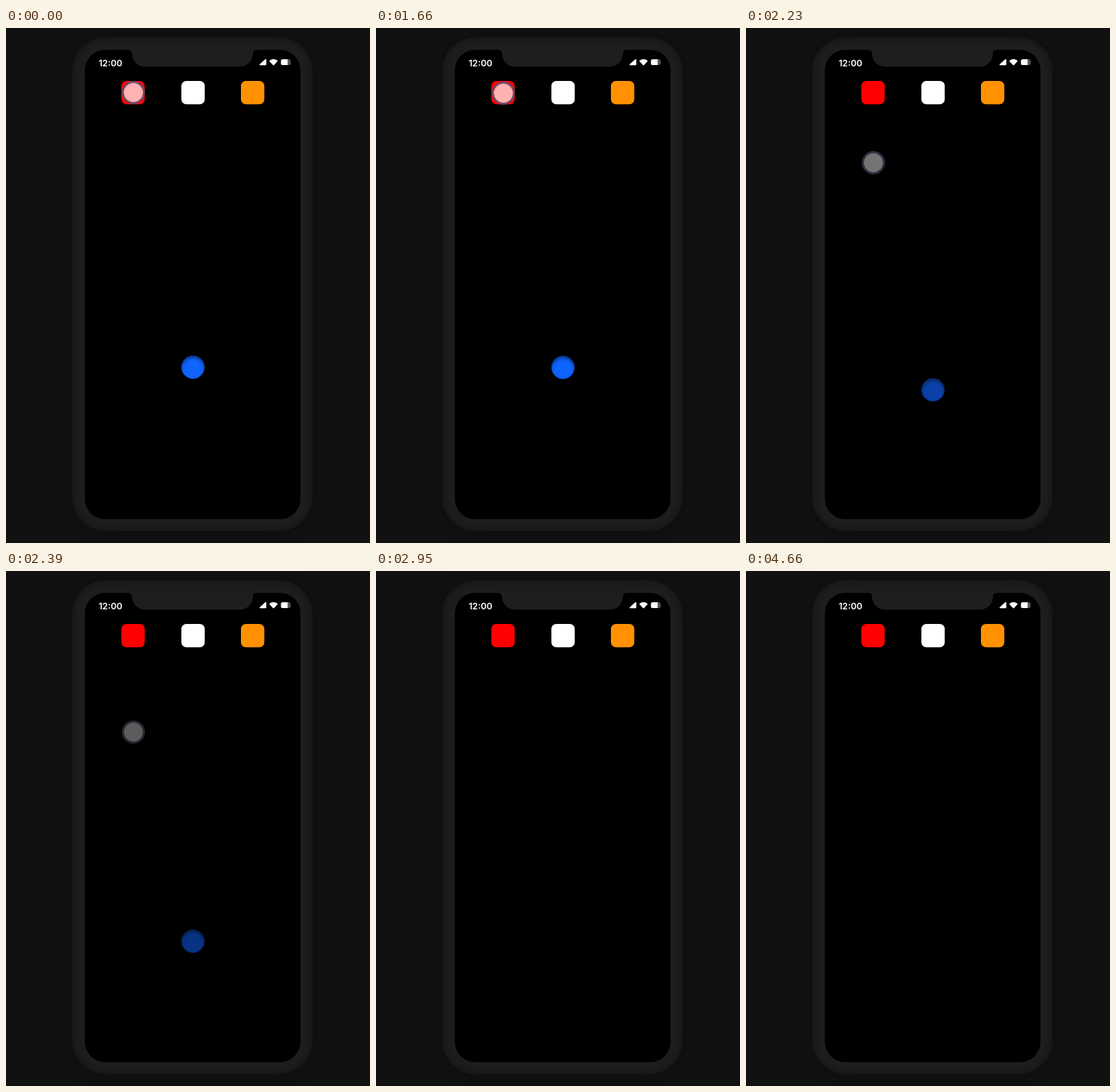
Animation, 550 px wide and 778 px high, one loop 4700 ms. Source, as an HTML page:

```html
<!DOCTYPE html>
<html lang="en">
<head>
<meta charset="utf-8">
<title>Phone prototype</title>
<style>
  html, body { margin: 0; width: 100%; height: 100%; overflow: hidden; background: #111; }
  body { position: relative; }
  div, svg { position: absolute; }
  .phone {
    left: 100px; top: 14px; width: 363px; height: 746px; border-radius: 51px;
    background: #1e1e1e;
    box-shadow: inset 0 0 14px #121212, 0 0 22px rgba(0, 0, 0, .25);
  }
  .screen { left: 118.5px; top: 33px; width: 326.5px; height: 708.5px; border-radius: 31px; background: #000; }
  svg { left: 0; top: 0; }
  text { font: 600 13.3px Inter, sans-serif; fill: #fff; }
  .ball, .touch { width: 35px; height: 35px; border-radius: 50%; box-sizing: border-box; will-change: transform; }
  .ball {
    left: 265.2px; top: 494.5px; background: #1064ff;
    box-shadow: inset 0 3px 5px rgba(0, 0, 0, .5);
  }
  .touch {
    left: 174.5px; top: 80.3px; background: rgba(255, 255, 255, .7) padding-box;
    border: 3.5px solid rgba(87, 89, 124, .85);
  }
</style>
</head>
<body>
<div class="phone"></div>
<div class="screen"></div>
<svg width="550" height="778" viewBox="0 0 550 778">
  <path fill="#1e1e1e" d="M184 32V33Q190.500 33 190.500 39A19.500 19.500 0 0 0 210 58.500H353.500A19.500 19.500 0 0 0 373 39Q373 33 379 33V32Z"/>
  <text x="140" y="57.500">12:00</text>
  <g fill="#fff">
    <path d="M392 47Q393.300 46.500 393.300 48V55Q393.300 56.200 392 56.200H384Q382.300 56 383.400 54.800Z"/>
    <path d="M398.300 49.200Q404.200 44.600 410.100 49.200Q410.700 49.700 410.200 50.300L405 56Q404.200 56.800 403.400 56L398.200 50.300Q397.700 49.700 398.300 49.200Z"/>
    <rect x="415.500" y="47.300" width="14.500" height="8.800" rx="2.500" fill="#555"/>
    <path d="M418 47.300H425.500V56.100H418A2.500 2.500 0 0 1 415.500 53.600V49.800A2.500 2.500 0 0 1 418 47.300Z"/>
  </g>
  <g>
    <rect x="174.300" y="80" width="35.300" height="35.200" rx="7.500" fill="#f00"/>
    <rect x="265" y="80" width="35.300" height="35.200" rx="7.500" fill="#fff"/>
    <rect x="355" y="80" width="35.300" height="35.200" rx="7.500" fill="#ff9100"/>
  </g>
</svg>
<div class="ball"></div>
<div class="touch"></div>
<script>
  const LOOP = 4700;
  const ball = document.querySelector('.ball');
  const touch = document.querySelector('.touch');

  // The motion pauses for 100 ms in every 280 ms.
  function steppedTime(t) {
    const beat = Math.floor((t - 1710) / 280);
    const rest = t - 1710 - beat * 280;
    return 97 + 190 * beat + (rest < 100 ? 0 : rest - 90);
  }

  function drop(el, distance, p) {
    el.style.transform = `translateY(${distance * p}px)`;
    el.style.opacity = 1 - p;
  }

  function draw(now) {
    const u = Math.min(1, Math.max(0, steppedTime(now % LOOP) / 715));
    const p = u ** 2.15;
    drop(touch, 304, p);
    drop(ball, 97.4, p);
    requestAnimationFrame(draw);
  }
  requestAnimationFrame(draw);
</script>
</body>
</html>
```
